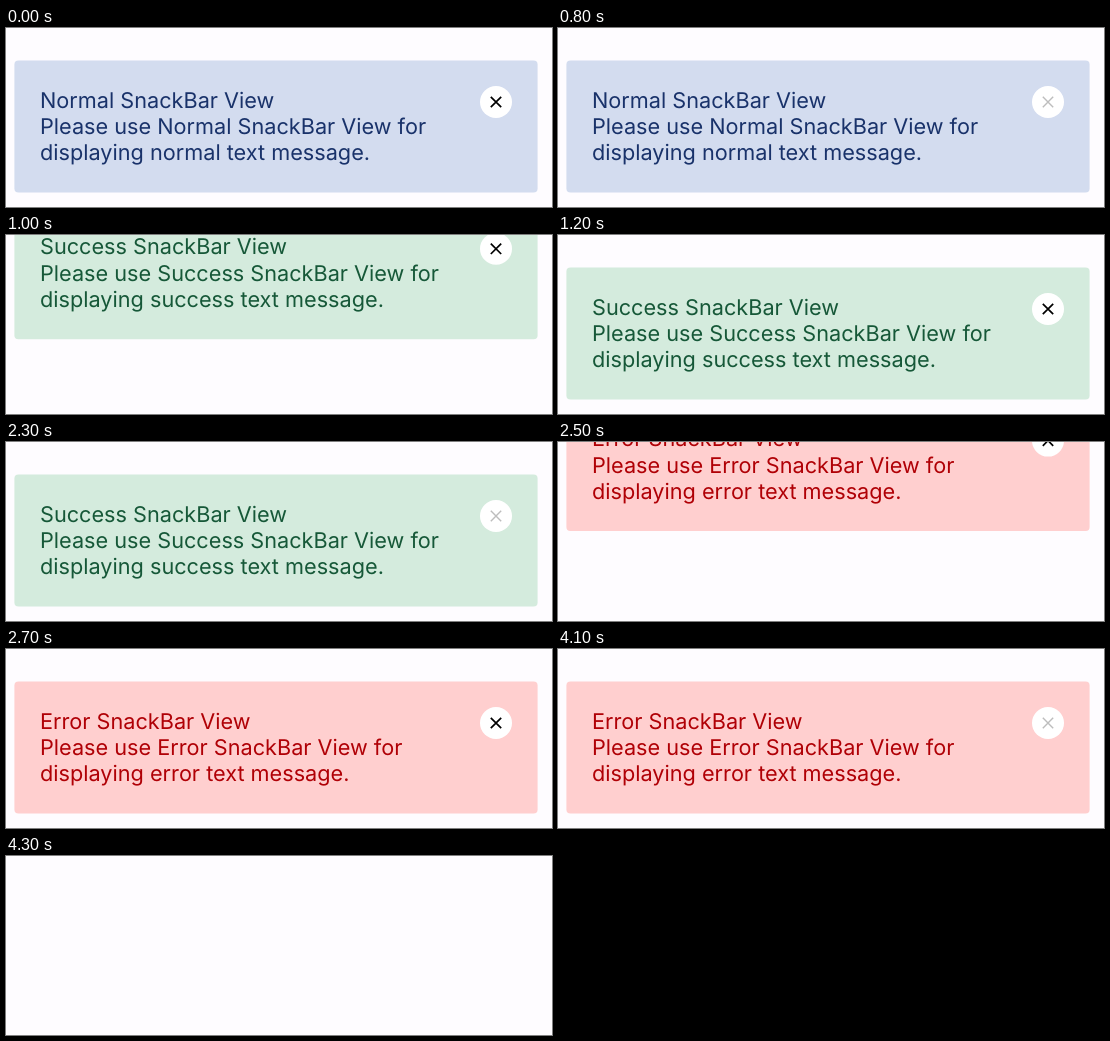
Recreate the animation shown at these times as an HTML page. Size 546 by 179 pixels, loop 4400 ms.

```html
<!DOCTYPE html>
<html lang="en">
<head>
<meta charset="utf-8">
<title>SnackBar views</title>
<style>
  html, body { margin: 0; width: 100%; height: 100%; overflow: hidden; background: #fefcff; }
  svg { display: block; width: 100%; height: 100%; }
  text { font: 21.68px Inter, "Open Sans", sans-serif; text-rendering: geometricPrecision; }
</style>
</head>
<body>
<svg viewBox="0 0 546 179">
  <g id="bar">
    <rect id="card" x="8.4" y="32.4" width="523.2" height="132" rx="4"/>
    <g id="message">
      <text x="34" y="79.6"></text>
      <text x="34" y="106"></text>
      <text x="34" y="132.4"></text>
    </g>
    <circle cx="490" cy="74" r="16" fill="#fff"/>
    <path id="cross" d="M484.8 68.8l10.4 10.4m0-10.4l-10.4 10.4" fill="none"/>
  </g>
</svg>
<script>
const LOOP = 4400, STEP = 100, TRAVEL = 165, ENTER = 250, EXIT = 200;

// Each bar slides in from the top at `enter` and its close button is pressed at `press`.
const bars = [
  { kind: "Normal", fill: "#d3dcef", ink: "#19326a", enter: -ENTER, press: 800 },
  { kind: "Success", fill: "#d4ebdd", ink: "#165838", enter: 901, press: 2300 },
  { kind: "Error", fill: "#ffcfcf", ink: "#b00006", enter: 2419, press: 4100 },
];

const byId = id => document.getElementById(id);
const bar = byId("bar"), card = byId("card"), message = byId("message"), cross = byId("cross");
const clamp = x => Math.min(1, Math.max(0, x));
const smooth = x => x * x * (3 - 2 * x);

function offset({ enter, press }, time) {
  const entering = (1 - clamp((time - enter) / ENTER)) ** 2;
  const leaving = smooth(clamp((time - press) / EXIT));
  return -TRAVEL * (entering + leaving);
}

function draw(time) {
  const current = bars.findLast(b => time >= b.enter);
  const { kind, fill, ink, press } = current;
  const pressed = time >= press;
  const lines = [
    `${kind} SnackBar View`,
    `Please use ${kind} SnackBar View for`,
    `displaying ${kind.toLowerCase()} text message.`,
  ];
  lines.forEach((line, i) => message.children[i].textContent = line);
  message.setAttribute("fill", ink);
  card.setAttribute("fill", fill);
  cross.setAttribute("stroke", pressed ? "#bdbdbd" : "#000");
  cross.setAttribute("stroke-width", pressed ? 1.4 : 1.7);
  bar.setAttribute("transform", `translate(0 ${offset(current, time)})`);
}

const start = performance.now();
function tick() {
  const time = (performance.now() - start) % LOOP;
  draw(Math.floor(time / STEP) * STEP);
  requestAnimationFrame(tick);
}
tick();
</script>
</body>
</html>
```
